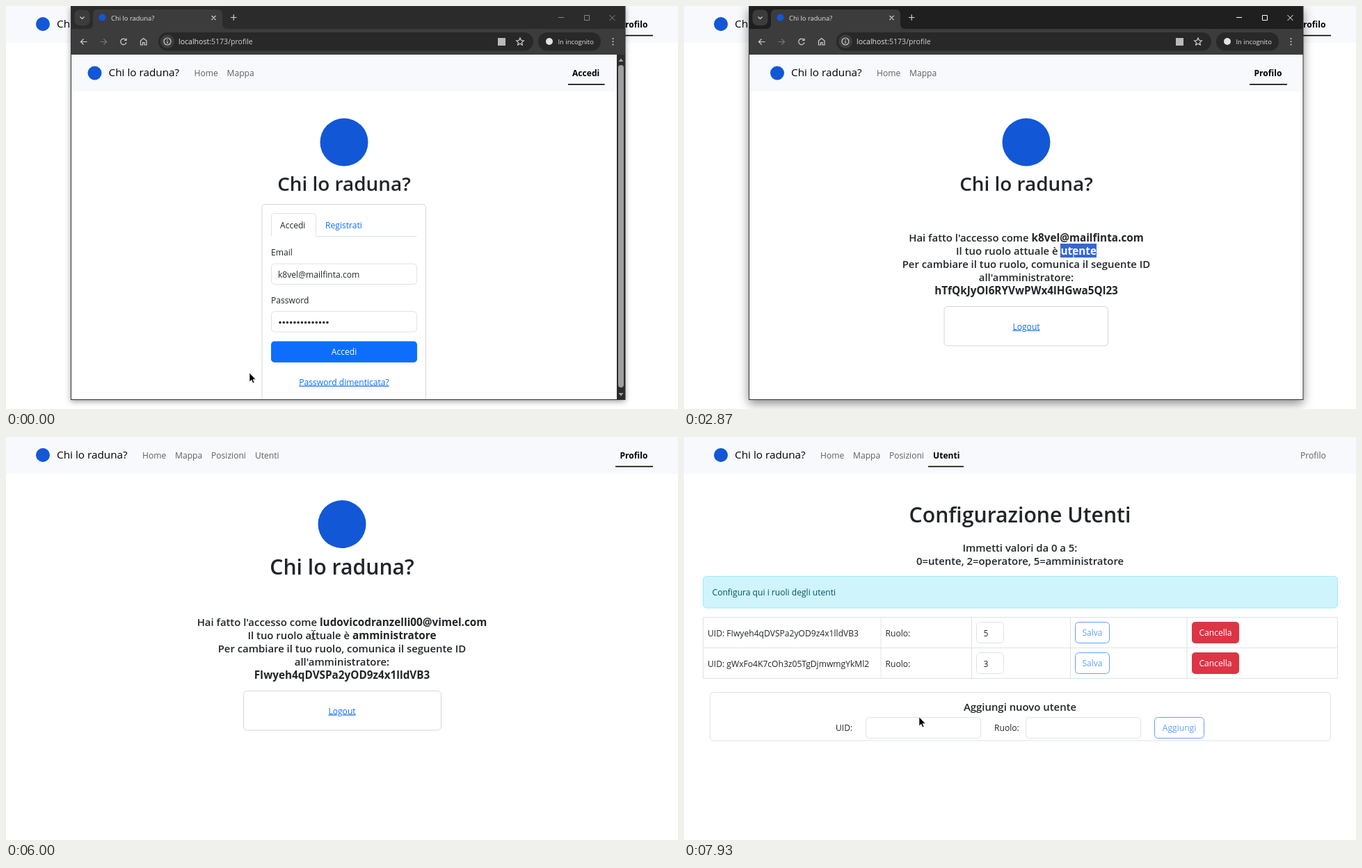
Write an HTML page that moves like this. It is 966 px wide and 580 px high and loops after 8 s.

```html
<!DOCTYPE html>
<html lang="it">
<head>
<meta charset="utf-8">
<title>Chi lo raduna?</title>
<style>
html, body { margin: 0; width: 100%; height: 100%; overflow: hidden; background: #fff; }
body { position: relative; font: 12.1px 'Open Sans', 'Noto Sans', sans-serif; color: #212529; }
svg, .scene { position: absolute; left: 0; top: 0; width: 966px; height: 580px; }
svg { display: block; }
text { fill: #212529; }
.m { text-anchor: middle; }
.on { font-weight: 700; fill: #000; }
.dim { fill: #5c5f62; }
.brand { font-size: 15.3px; fill: #000; }
.h1 { font-weight: 600; font-size: 30.2px; text-anchor: middle; }
.h1.small { font-size: 27.9px; }
.h5 { font-weight: 600; font-size: 14.9px; text-anchor: middle; }
.link { fill: #0d6efd; }
.u { text-decoration: underline; }
.white { fill: #fff; }
.logo { fill: #1257d6; }
.box { fill: #fff; stroke: #dee2e6; }
.card { fill: #fff; stroke: #d5d6d7; }
.ghost { fill: #fff; stroke: #0d6efd; }
.info { position: absolute; width: 500px; text-align: center; font-weight: 600; font-size: 14.9px; line-height: 19.2px; }
.info b { font-weight: 700; font-size: 15.3px; line-height: 1; }

/* browser window */
#frame { position: absolute; left: 93px; top: 0; width: 797px; height: 567px; background: #fff; }
.ui { font-size: 9.4px; fill: #e3e3e3; }
.icon { fill: none; stroke: #d2d2d2; stroke-width: 1.2; }

/* timeline: one shared 8 s clock */
#win, #frame, #bar, #ctl, #login, #profile, #users, #btn, #role, #uid, #hover, #status, #arrow, #hand, #beam {
  animation: 8s step-end -5ms infinite;
}
#win { animation-name: win; }
#frame { animation-name: shadow; }
#bar { animation-name: bar; }
#ctl { animation-name: ctl; }
#login { animation-name: login; }
#profile { animation-name: profile; }
#users { animation-name: users; }
#btn { animation-name: btn; }
#role { animation-name: role; }
#uid { animation-name: uid; }
#hover { animation-name: hover; }
#status { animation-name: status; }
#arrow { animation-name: arrow; }
#hand { animation-name: hand; }
#beam { animation-name: beam; }
#cursor { animation: move 8s -5ms infinite; }

@keyframes win { 0% { opacity: 1 } 65%, 100% { opacity: 0 } }
@keyframes shadow {
  0% { box-shadow: 0 2px 8px #0006 }
  13.33%, 100% { box-shadow: 0 5px 14px #0007 }
}
@keyframes bar { 0% { fill: #2b2b2b } 13.33%, 100% { fill: #1f1f1f } }
@keyframes ctl { 0% { stroke: #858585 } 13.33%, 100% { stroke: #fff } }
@keyframes login { 0% { opacity: 1 } 20.83%, 100% { opacity: 0 } }
@keyframes profile { 0% { opacity: 0 } 20.83%, 100% { opacity: 1 } }
@keyframes users { 0% { opacity: 0 } 89.17%, 100% { opacity: 1 } }
@keyframes btn {
  0% { fill: #0d6efd } 6.67% { fill: #0b5ed7 } 13.33% { fill: #0a58ca } 15%, 100% { fill: #0b5ed7 }
}
@keyframes role {
  0%, 44.17%, 100% { background: none; color: #212529 }
  35.83% { background: #3367d1; color: #fff }
}
@keyframes uid {
  0% { background: none; color: #212529 }
  45.83%, 100% { background: #3367d1; color: #fff }
}
@keyframes hover { 0% { opacity: 0 } 85.83%, 100% { opacity: 1 } }
@keyframes status { 0%, 90.83%, 100% { opacity: 0 } 85.83% { opacity: 1 } }
@keyframes arrow {
  0%, 20.83%, 58.33%, 76.67%, 90%, 100% { opacity: 1 }
  6.67%, 30%, 74.17%, 85.83% { opacity: 0 }
}
@keyframes hand {
  0%, 20.83%, 90%, 100% { opacity: 0 }
  6.67%, 85.83% { opacity: 1 }
}
@keyframes beam {
  0%, 58.33%, 76.67%, 100% { opacity: 0; stroke: #222 }
  30%, 44.17%, 74.17% { opacity: 1; stroke: #222 }
  35.83%, 45.83% { opacity: 1; stroke: #fff }
}
@keyframes move {
  0% { transform: translate(350px, 528px); animation-timing-function: step-end }
  .83% { transform: translate(355px, 528px); animation-timing-function: step-end }
  2.5% { transform: translate(355px, 528px); animation-timing-function: steps(3) }
  5% { transform: translate(390px, 518px); animation-timing-function: steps(4) }
  8.33% { transform: translate(464px, 504px); animation-timing-function: step-end }
  25% { transform: translate(464px, 504px); animation-timing-function: steps(4) }
  28.33% { transform: translate(505px, 440px); animation-timing-function: steps(5) }
  32.5% { transform: translate(560px, 356px); animation-timing-function: step-end }
  38.33% { transform: translate(560px, 356px); animation-timing-function: steps(7) }
  44.17% { transform: translate(491px, 413px); animation-timing-function: step-end }
  56.67% { transform: translate(491px, 413px); animation-timing-function: steps(3) }
  59.17% { transform: translate(310px, 426px); animation-timing-function: steps(3) }
  61.67% { transform: translate(78px, 401px); animation-timing-function: step-end }
  67.5% { transform: translate(78px, 401px); animation-timing-function: steps(4) }
  70.83% { transform: translate(190px, 405px); animation-timing-function: steps(5) }
  75% { transform: translate(442px, 285px); animation-timing-function: steps(4) }
  78.33% { transform: translate(724px, 88px); animation-timing-function: steps(5) }
  82.5% { transform: translate(440px, 36px); animation-timing-function: steps(5) }
  86.67% { transform: translate(374px, 21px); animation-timing-function: step-end }
  88.33% { transform: translate(374px, 21px); animation-timing-function: steps(6) }
  93.33% { transform: translate(362px, 180px); animation-timing-function: steps(7) }
  99.17%, 100% { transform: translate(338px, 403px); animation-timing-function: step-end }
}
</style>
</head>
<body>

<!-- administrator's profile page -->
<div class="scene">
  <svg>
    <defs>
      <g id="nav">
        <circle class="logo" cx="53" cy="26" r="10"/>
        <text class="brand" x="73" y="30.5">Chi lo raduna?</text>
        <text class="dim" x="196" y="30.5">Home</text>
        <text class="dim" x="243" y="30.5">Mappa</text>
      </g>
      <g id="field"><rect class="box" x=".5" y=".5" width="39" height="30" rx="5"/></g>
      <g id="save" opacity=".65">
        <rect class="ghost" x=".5" y=".5" width="49" height="30" rx="5"/>
        <text class="m link" x="25" y="20">Salva</text>
      </g>
      <g id="del">
        <rect width="68" height="31" rx="5" fill="#dc3545"/>
        <text class="m white" x="34" y="20">Cancella</text>
      </g>
    </defs>
    <rect width="966" height="53" fill="#f8f9fc"/>
    <use href="#nav"/>
    <text class="dim" x="295" y="30.5">Posizioni</text>
    <text class="dim" x="358" y="30.5">Utenti</text>
    <rect id="hover" x="351" y="41.7" width="47.5" height="1.6"/>
    <text class="on" x="882.5" y="30.5">Profilo</text>
    <rect x="876" y="41.7" width="54" height="1.6"/>
    <circle class="logo" cx="483" cy="125.5" r="34.5"/>
    <text class="h1" x="483" y="198">Chi lo raduna?</text>
    <rect class="card" x="341.5" y="365.5" width="284" height="56.5" rx="5"/>
    <text class="m link u" x="483" y="398.5">Logout</text>
  </svg>
  <div class="info" style="left:233px;top:256.5px">
    Hai fatto l'accesso come <b>ludovicodranzelli00@vimel.com</b><br>
    Il tuo ruolo attuale è <b>amministratore</b><br>
    Per cambiare il tuo ruolo, comunica il seguente ID<br>
    all'amministratore:<br>
    <b>FIwyeh4qDVSPa2yOD9z4x1lldVB3</b>
  </div>
</div>

<!-- incognito window -->
<div class="scene" id="win">
  <div id="frame"></div>

  <div class="scene" id="login">
    <svg>
      <rect x="94" y="70" width="785" height="53" fill="#f8f9fc"/>
      <use href="#nav" x="74.5" y="70.5"/>
      <text class="on" x="814" y="101">Accedi</text>
      <rect x="808" y="112" width="52.5" height="1.6"/>
      <circle class="logo" cx="486" cy="196" r="34.5"/>
      <text class="h1 small" x="486" y="266">Chi lo raduna?</text>
      <path class="card" d="M368 566V290.5q0-5 5-5H598.5q5 0 5 5V566"/>
      <path class="box" d="M381.5 331V303.5q0-5 5-5H440.5q5 0 5 5V331.5H590.5"/>
      <text x="394" y="320">Accedi</text>
      <text class="link" x="459" y="320">Registrati</text>
      <text x="381" y="359">Email</text>
      <rect class="box" x="381.5" y="371" width="209" height="29.5" rx="5"/>
      <text x="391" y="390.5">k8vel@mailfinta.com</text>
      <text x="381" y="428">Password</text>
      <rect class="box" x="381.5" y="439.5" width="209" height="29.5" rx="5"/>
      <path d="M394 455.5H462.5" stroke="#212529" stroke-width="3.6" stroke-linecap="round" stroke-dasharray="0 5.23"/>
      <rect id="btn" x="381" y="482.5" width="210" height="30.5" rx="5"/>
      <text class="m white" x="486" y="502">Accedi</text>
      <text class="m link u" x="486" y="545.5">Password dimenticata?</text>
      <rect x="878" y="70" width="12" height="497" fill="#2c2c2c"/>
      <rect x="880" y="85" width="8" height="464" rx="4" fill="#9f9f9f"/>
      <path d="M880.5 80l3.5-4.5 3.5 4.5zM880.5 557l3.5 4.5 3.5-4.5z" fill="#9f9f9f"/>
    </svg>
  </div>

  <div class="scene" id="profile">
    <svg>
      <rect x="94" y="70" width="796" height="53" fill="#f8f9fc"/>
      <use href="#nav" x="81" y="70.5"/>
      <text class="on" x="819.5" y="101">Profilo</text>
      <rect x="813" y="112" width="54" height="1.6"/>
      <circle class="logo" cx="492" cy="196" r="34.5"/>
      <text class="h1 small" x="492" y="266">Chi lo raduna?</text>
      <rect class="card" x="374" y="432.5" width="235.5" height="56.5" rx="5"/>
      <text class="m link u" x="492" y="465.5">Logout</text>
    </svg>
    <div class="info" style="left:242px;top:323.5px">
      Hai fatto l'accesso come <b>k8vel@mailfinta.com</b><br>
      Il tuo ruolo attuale è <b id="role">utente</b><br>
      Per cambiare il tuo ruolo, comunica il seguente ID<br>
      all'amministratore:<br>
      <b id="uid">hTfQkJyOI6RYVwPWx4lHGwa5Ql23</b>
    </div>
  </div>

  <svg>
    <rect id="bar" x="93" width="797" height="34"/>
    <rect x="93" y="33" width="797" height="37" fill="#3c3c3c"/>
    <rect x="98.5" y="5.5" width="22" height="22.5" rx="7" fill="#3c3c3c"/>
    <path d="M118 33q7 0 7-7V12q0-7 7-7H304q7 0 7 7V26q0 7 7 7z" fill="#3c3c3c"/>
    <circle class="logo" cx="138.5" cy="16.5" r="5"/>
    <text class="ui" x="151" y="20.5">Chi lo raduna?</text>
    <rect x="219" y="38" width="539" height="26.5" rx="13" fill="#282828"/>
    <rect x="765" y="38" width="90" height="26.5" rx="13" fill="#282828"/>
    <circle cx="232" cy="51" r="10" fill="#3c3c3c"/>
    <g class="icon">
      <path d="M106.5 15.5l3 3 3-3M295.5 14l6 6m0-6l-6 6M323 16.5h8.5m-4.25-4.25v8.5"/>
      <path d="M116.5 51.5h-9m4-4l-4 4 4 4"/>
      <path d="M135.5 51.5h9m-4-4l4 4-4 4" stroke="#777"/>
      <path d="M172 48.5a4.2 4.2 0 1 0 1 4M173 46.5v3h-3"/>
      <path d="M193.5 50v6h3v-3.5h2.5v3.5h3v-6l-4.25-3.5z"/>
      <circle cx="232" cy="51" r="5"/>
      <path d="M232 50.5v3.5m0-6v1.3"/>
      <path d="M739 46l1.6 3.5 3.7.4-2.8 2.5.8 3.7-3.3-1.9-3.3 1.9.8-3.7-2.8-2.5 3.7-.4z"/>
    </g>
    <rect x="707" y="46" width="11" height="11" fill="#b9b9b9"/>
    <circle cx="781" cy="51" r="5" fill="#e3e3e3"/>
    <path d="M872.5 47v9" stroke="#d2d2d2" stroke-width="2" stroke-linecap="round" stroke-dasharray="0 4.2"/>
    <text class="ui" style="font-size:10.55px" x="248" y="55">localhost<tspan fill="#d0d0d0">:5173/profile</tspan></text>
    <text class="ui" x="793.5" y="54.5">In incognito</text>
    <path id="ctl" d="M794 16.5h8M831.5 13.5h7v7h-7zM867.5 13l8 8m0-8l-8 8" fill="none"/>
    <rect x="93.5" y=".5" width="796.5" height="566" fill="none" stroke="#333"/>
  </svg>
</div>

<!-- user roles page -->
<div class="scene" id="users">
  <svg>
    <rect width="966" height="580" fill="#fff"/>
    <rect width="966" height="53" fill="#f8f9fc"/>
    <use href="#nav"/>
    <text class="dim" x="295" y="30.5">Posizioni</text>
    <text class="on" x="358" y="30.5">Utenti</text>
    <rect x="351" y="41.7" width="51" height="1.6"/>
    <text class="dim" x="886" y="30.5">Profilo</text>
    <text class="h1" x="483" y="123">Configurazione Utenti</text>
    <text class="h5" x="483" y="164.5">Immetti valori da 0 a 5:</text>
    <text class="h5" x="483" y="183.7">0=utente, 2=operatore, 5=amministratore</text>
    <rect x="27.5" y="200.5" width="912" height="45.5" rx="5" fill="#cff4fc" stroke="#9eeaf9"/>
    <text x="40.5" y="228" style="fill:#055160">Configura qui i ruoli degli utenti</text>
    <path d="M27.5 259.5H939.5V347.5H27.5zM27.5 303.5H939.5M283 259.5v88M413.5 259.5v88M555.5 259.5v88M723 259.5v88" fill="none" stroke="#dee2e6"/>
    <text x="34" y="286.5">UID: FIwyeh4qDVSPa2yOD9z4x1lldVB3</text>
    <text x="34" y="330.5">UID: gWxFo4K7cOh3z05TgDjmwmgYkMl2</text>
    <text x="289.5" y="286.5">Ruolo:</text>
    <text x="289.5" y="330.5">Ruolo:</text>
    <use href="#field" x="420" y="266"/>
    <use href="#field" x="420" y="310"/>
    <text x="430.5" y="286.5">5</text>
    <text x="430.5" y="330.5">3</text>
    <use href="#save" x="562" y="266"/>
    <use href="#save" x="562" y="310"/>
    <use href="#del" x="730" y="266"/>
    <use href="#del" x="730" y="310"/>
    <rect class="box" x="37.5" y="367.5" width="892" height="69.5" rx="5"/>
    <text class="h5" x="483" y="393.5">Aggiungi nuovo utente</text>
    <text x="218" y="423">UID:</text>
    <rect class="box" x="261.5" y="403.5" width="165" height="30" rx="5"/>
    <text x="446" y="423">Ruolo:</text>
    <rect class="box" x="491.5" y="403.5" width="165" height="30" rx="5"/>
    <g opacity=".65">
      <rect class="ghost" x="676.5" y="403.5" width="71" height="30" rx="5"/>
      <text class="m link" x="712" y="423">Aggiungi</text>
    </g>
  </svg>
</div>

<svg>
  <g id="status">
    <path d="M0 563H92q4 0 4 4V580H0z"/>
    <text class="white" style="font-size:9px" x="4" y="575">localhost:5173/users</text>
  </g>
  <g id="cursor">
    <path id="arrow" d="M0 0V12.8L2.9 10.2 5 14.8 7 14 5 9.5H9z" stroke="#fff" stroke-width=".6"/>
    <path id="beam" d="M-3-6.5h2l1 1 1-1h2M-3 6.5h2l1-1 1 1h2M0-5.5v11" fill="none"/>
    <path id="hand" d="M-1.2 0Q0-1.5 1.2 0V5Q3 4 4 5.5 6 5 6.5 6.5 9 6 9 8.5V12Q8.5 14 7.5 17H0Q-1 14-4 10.5-4.5 8.5-2.5 9L-1.2 10.3z" stroke="#fff" stroke-width=".6"/>
  </g>
</svg>
</body>
</html>
```
